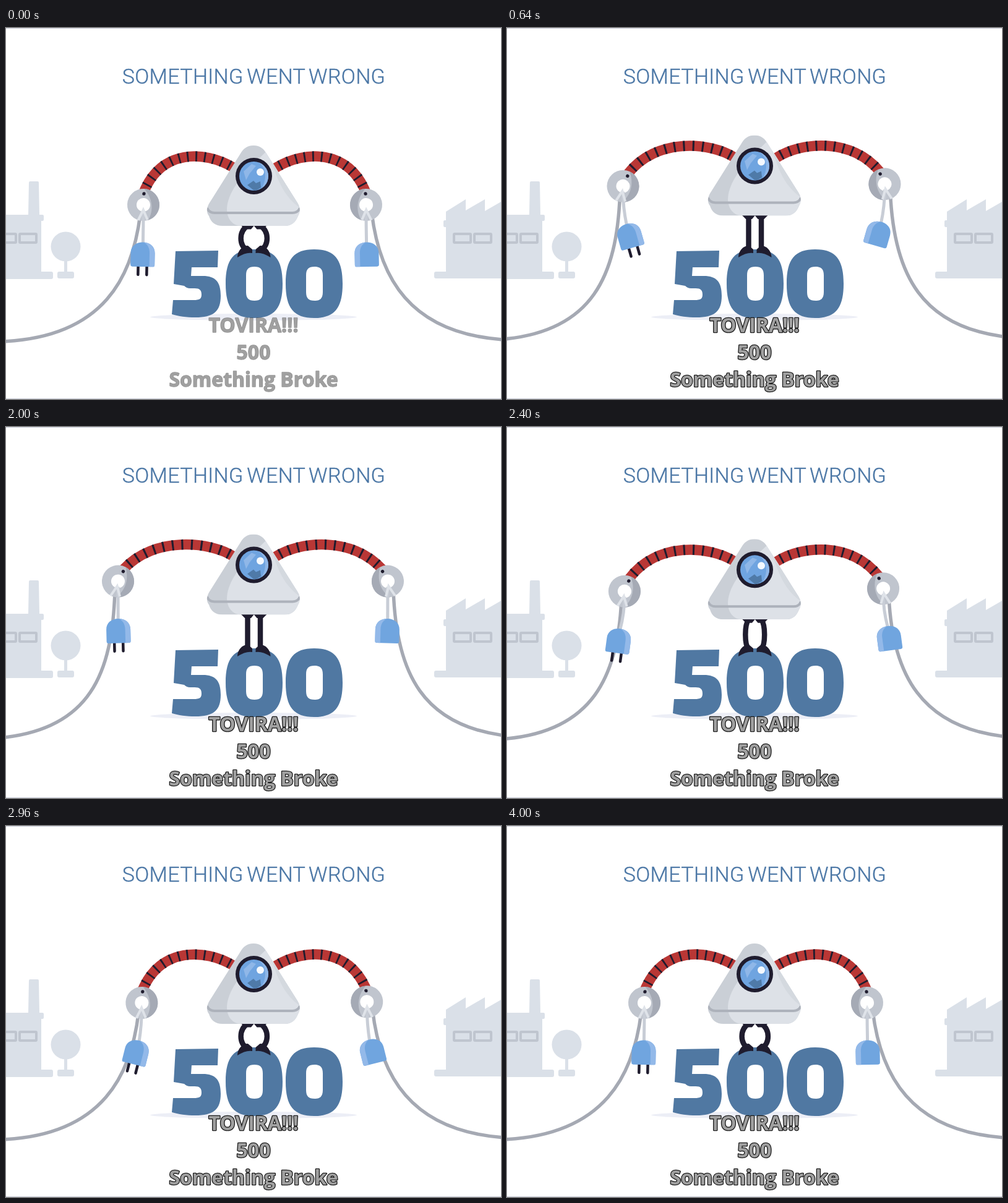
Write an HTML page that moves like this. It is 800 px wide and 600 px high and loops after 4080 ms.

```html
<!DOCTYPE html>
<html lang="en">
<head>
<meta charset="utf-8">
<title>Something went wrong</title>
<style>
  html, body { margin: 0; height: 100%; overflow: hidden; background: #fff; }
  svg { display: block; width: 100vw; height: 100vh; }
  .title { font: 300 34px Roboto, sans-serif; letter-spacing: .3px; word-spacing: -3px; fill: #4a76a5; stroke: #4a76a5; stroke-width: .4; }
  .caption { font: 700 32px "Open Sans", sans-serif; fill: #a0a0a0; stroke: #1c1c1c; stroke-linejoin: round; paint-order: stroke; }
  .window { fill: none; stroke: #bfc5cf; stroke-width: 4; }
  .line { fill: none; }
</style>
</head>
<body>
<svg viewBox="0 0 800 600">
  <path d="M0 .5H800M0 599.5H800" stroke="#cbced9"/>
  <text class="title" x="400.5" y="90" text-anchor="middle">SOMETHING WENT WRONG</text>

  <g fill="#dae0e8">
    <path d="M37 250q0-2 2-2h12q2 0 2 2l1 52h5q2 0 2 2v6q0 2-2 2h-2v82h16q3 0 3 3v6q0 3-3 3H0V302h36z"/>
    <circle cx="96.5" cy="353.5" r="24"/>
    <path d="M94 375h5v19h8q3 0 3 3v5q0 3-3 3H86q-3 0-3-3v-5q0-3 3-3h8z"/>
    <path d="M711 297l32-20v18l31-18v19l26-15v124H695q-3 0-3-3v-5q0-3 3-3h16v-72h-2q-2 0-2-2v-7q0-2 2-2h2z"/>
  </g>
  <g class="window">
    <rect x="-12" y="333" width="28" height="14" rx="1"/>
    <rect x="22" y="333" width="27" height="14" rx="1"/>
    <rect x="724" y="333" width="27" height="14" rx="1"/>
    <rect x="757" y="333" width="27" height="14" rx="1"/>
  </g>

  <ellipse cx="400" cy="467.5" rx="167" ry="5.5" fill="#eceef6"/>
  <g fill="#5078a2" fill-rule="evenodd" role="img" aria-label="500">
    <path d="M274 361L343 360 342 387H300L299 401H318C339 401 347 411 347 433 347 459 335 468 306 468 292 468 278 466 268 463L270 440H303C313 440 316 438 316 431 316 424 313 421 305 421H297Q292 421 288 417L271 414Z"/>
    <path id="zero" d="M401 358C434 358 447 374 447 413.5S434 469 401 469 355 453 355 413.5 368 358 401 358ZM401.500 386C392 386 388 390 388 400V427C388 437 392 441 401.500 441S415 437 415 427V400C415 390 411 386 401.500 386Z"/>
    <use href="#zero" x="97"/>
  </g>

  <g id="sides"></g>

  <g fill="#1f1c2e">
    <g id="leg">
      <path class="bow line" stroke="#1f1c2e" stroke-width="8.500"/>
      <path class="hip" d="M380 0H401L396 6H386Z"/>
      <path d="M374 371C374 360 382 352 391 352L398 358V364Q388 362 374 371Z"/>
    </g>
    <use href="#leg" transform="translate(801.500) scale(-1 1)"/>
  </g>

  <g id="body">
    <clipPath id="hull">
      <path d="M400 190C411 190 417 196 421 203L470 281C478 293 474 300 472 304 468 314 462 320 450 320H350C338 320 331 314 328 304 325 300 322 293 330 281L379 203C383 196 389 190 400 190Z"/>
    </clipPath>
    <g clip-path="url(#hull)">
      <path d="M320 185H480V325H320Z" fill="#cacfd6"/>
      <path d="M436 185C405 215 358 255 357 293 357 308 366 320 380 320H480V185Z" fill="#dde1e7"/>
      <path d="M418 195C436 220 436 265 477 292V190Z" fill="#cfd4db" opacity=".6"/>
      <path class="line" d="M325 291q3 8 12 8H463q9 0 12-8" stroke="#adb2bb" stroke-width="4"/>
    </g>
    <circle cx="400.500" cy="239.500" r="29.500" fill="#1f1c2e"/>
    <clipPath id="lens"><circle cx="400.500" cy="239.500" r="23.500"/></clipPath>
    <g clip-path="url(#lens)">
      <path d="M370 210H430V270H370Z" fill="#6fa4e0"/>
      <path d="M404 214C424 226 422 248 410 264H428V214Z" fill="#8fb7e8"/>
      <path d="M384 232L397 220 404 223 394 235 388 246Z" fill="#8fb7e8"/>
      <path d="M390 254L400 247 404 251 411 248 412 258 402 264Z" fill="#4f7aa8"/>
    </g>
    <circle cx="411" cy="233" r="6" fill="#f4f9ff"/>
  </g>

  <g id="caption" class="caption" text-anchor="middle">
    <text x="400" y="491.7">TOVIRA!!!</text>
    <text x="400" y="535.7">500</text>
    <text x="400" y="579.7">Something Broke</text>
  </g>
</svg>

<script>
const LOOP = 4080, STEP = 80, LIFT = 16.5;
const $ = (selector, root = document) => root.querySelector(selector);
const clamp = v => Math.min(1, Math.max(0, v));
const ease = (t, start, end) => {
  const p = clamp((t - start) / (end - start));
  return p * p * (3 - 2 * p);
};

// Turning points of the hanging plug: [time, sideways offset]
const SWING = [[0, -1], [530, 14], [1000, -9], [1600, 4], [2140, 0], [2660, -19], [3300, 4], [3800, -1], [LOOP, -1]];
function swingAt(t) {
  const i = SWING.findIndex(([time]) => time > t);
  const [t0, v0] = SWING[i - 1], [t1, v1] = SWING[i];
  return v0 + (v1 - v0) * ease(t, t0, t1);
}

// Both sides use left-hand coordinates; the right one is mirrored.
function makeSide({ mirrored, reach, bendX, bendY }) {
  const side = document.createElementNS("http://www.w3.org/2000/svg", "g");
  if (mirrored) side.setAttribute("transform", "translate(804) scale(-1 1)");
  const prongs = '<path d="M-7 18V33M7 18V33" stroke="#1f1c2e" stroke-width="4.500" stroke-linecap="round"/>';
  side.innerHTML = `
    <path class="cable line" stroke="#a5a9b3" stroke-width="5.500" ${mirrored ? 'transform="translate(-4 -2.500)"' : ""}/>
    <path class="arm line" stroke="#b93735" stroke-width="16.500"/>
    <path class="bands line" stroke="#1f1c2e" stroke-width="16.500" pathLength="12.500" stroke-dasharray=".2 .8" stroke-dashoffset="-.5"/>
    <g class="ring">
      <circle r="26" fill="#c0c5ce"/>
      <path d="M0-26A26 26 0 0 1 9 24.400C18 8 14-12 0-26Z" fill="#a5aab5"/>
      <circle r="11" fill="#fff"/>
      <circle cy="-18" r="2.700" fill="#1f1c2e"/>
    </g>
    <path class="strap line" stroke="#c8cdd6" stroke-width="5"/>
    <path class="knot line" d="M-8 25L0 8 7 24" stroke="#dfe3e9" stroke-width="4"/>
    <g class="plug">
      ${mirrored ? "" : prongs}
      <path d="M-19.500 17V-2C-19.500-14-10-19.500 0-19.500S19.500-14 19.500-2V17q0 3-3 3H-16.500q-3 0-3-3Z" fill="#70a5df"/>
      <path d="M1-19.500C11-19 19.500-13 19.500-2V17q0 3-3 3H11V-2C11-10 8-16 1-19.500Z" fill="#93b9e9"/>
    </g>`;
  $("#sides").append(side);
  const set = (name, attribute, value) => $("." + name, side).setAttribute(attribute, value);

  return (lift, spread, swing, tilt) => {
    const rise = LIFT * lift;
    const x = 222 - reach * spread ** bendX, y = 286 - rise - 20 * spread ** bendY;
    const turn = 3 + 25 * spread, angle = turn * Math.PI / 180;
    const endX = x + 18 * Math.sin(angle), endY = y - 18 * Math.cos(angle) - 3;

    const pull = (286 - y) / 36;
    set("cable", "d", `M${x - 5} ${y + 15}C${x - 17 + 8 * spread} 400 ${160 - 25 * spread} ${500 - 12 * pull} -6 ${507 - 4.5 * pull}`);
    const arm = `M368 ${226 - rise}C${320 + 10 * spread} ${197 - rise + 4.5 * spread} ${endX + 27 + 23 * spread} ${197 - rise - 5 * spread} ${endX} ${endY}`;
    set("arm", "d", arm);
    set("bands", "d", arm);
    set("ring", "transform", `translate(${x} ${y}) rotate(${turn})`);
    set("knot", "transform", `translate(${x} ${y}) rotate(${turn / 3})`);

    const plugX = x + swing, plugY = y + 80, radians = tilt * Math.PI / 180;
    const topX = plugX + 18 * Math.sin(radians), topY = plugY - 18 * Math.cos(radians);
    set("strap", "d", `M${x} ${y + 9}Q${x} ${y + 35} ${topX} ${topY}`);
    set("plug", "transform", `translate(${plugX} ${plugY}) rotate(${tilt})`);
  };
}

const sides = [
  makeSide({ mirrored: false, reach: 41, bendX: 1, bendY: 2.2 }),
  makeSide({ mirrored: true, reach: 35, bendX: 1.2, bendY: 0.9 })
];

function draw(now) {
  const frame = Math.floor((now % LOOP) / STEP), t = frame * STEP;
  const lift = ease(t, 40, 600) - ease(t, 2100, 2720);
  const spread = ease(t, 60, 835) - ease(t, 2090, 3120);
  const swing = swingAt(t);
  const tilt = -1.2 * swingAt(Math.max(0, t - 60)); // the plug turns slightly after its strap
  const hipY = 319.5 - LIFT * lift, bowX = 390.5 - 14.5 * (1 - lift);

  sides.forEach(update => update(lift, spread, swing, tilt));
  $("#body").setAttribute("transform", `translate(0 ${-LIFT * lift})`);
  $(".bow").setAttribute("d", `M390.5 ${hipY}C${bowX} ${hipY + 10} ${bowX} 351 390.5 360`);
  $(".hip").setAttribute("transform", `translate(0 ${hipY})`);

  // The caption outline builds up over the first steps.
  const outline = 1 - 0.5 ** (frame + 1);
  $("#caption").setAttribute("stroke-opacity", outline);
  $("#caption").setAttribute("stroke-width", 2.6 * outline);
  requestAnimationFrame(draw);
}
draw(performance.now());
</script>
</body>
</html>
```
